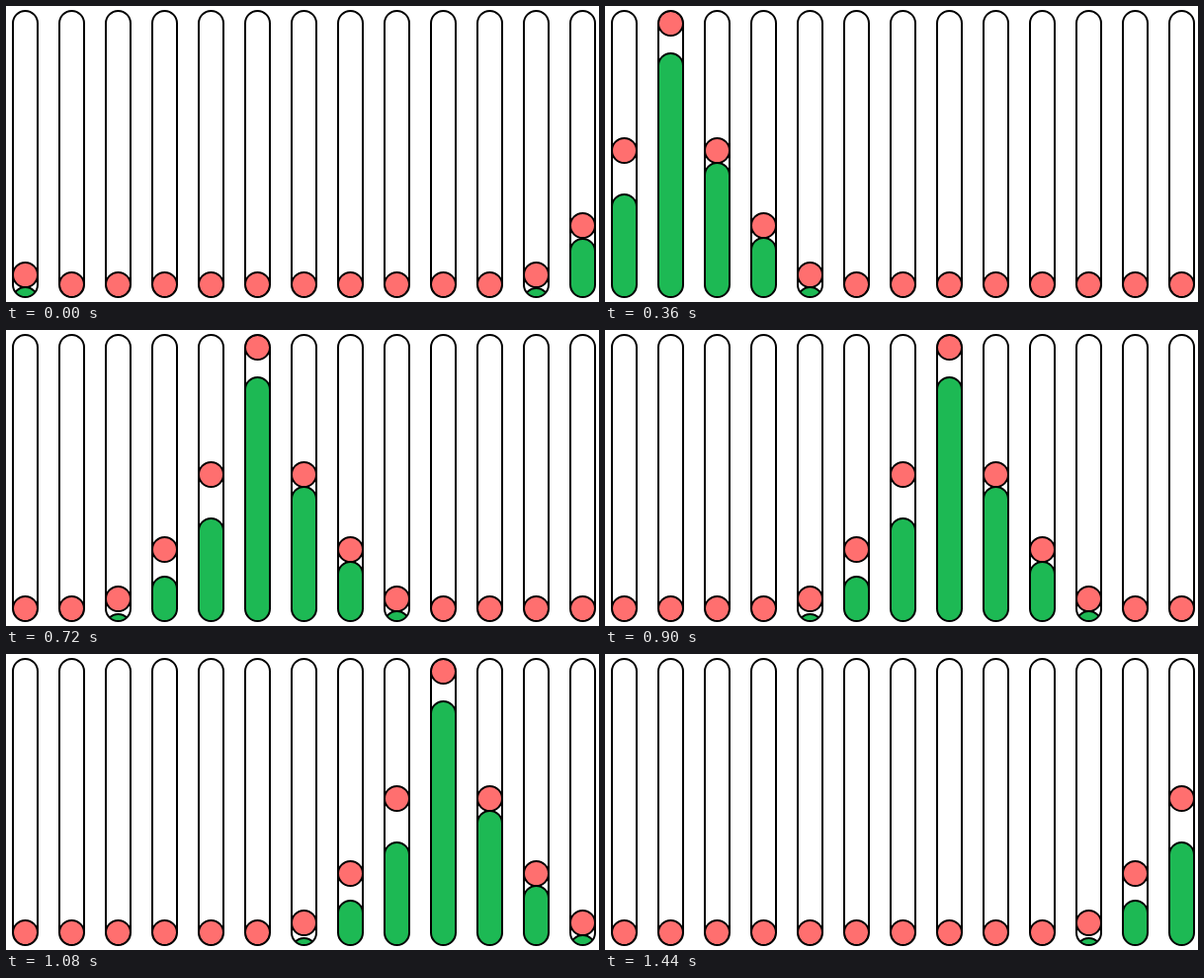
Animation of 600 by 300 pixels, one loop 1530 ms. Source, as an HTML page with a canvas:

```html
<!DOCTYPE html>
<html lang="en">
<head>
<meta charset="utf-8">
<title>Wave of balls in tubes</title>
<style>
  html, body { margin: 0; width: 100%; height: 100%; overflow: hidden; background: #fff; }
  canvas { display: block; }
</style>
</head>
<body>
<canvas id="stage" width="600" height="300"></canvas>
<script>
const ctx = document.getElementById('stage').getContext('2d');
const TUBES = 13, PITCH = 47, LEFT = 7, TOP = 5, BOTTOM = 295, W = 25, R = W / 2;
const STEP = 90, STEPS = 17;
const RED = '#ff6f6f', GREEN = '#1db954';

// Heights by distance from the crest
const LIFT = [265, 136, 60, 10];
const TRAIL = [247, 104, 45, 7];

function pill(x, y, h) {
  ctx.beginPath();
  ctx.roundRect(x, y, W, h, R);
}

function paint(color) {
  ctx.fillStyle = color;
  ctx.fill();
  ctx.stroke();
}

function tube(x, lift, level) {
  ctx.save();
  pill(x, TOP, BOTTOM - TOP);
  ctx.clip();
  if (level) {
    // The column runs on below the tube, so low levels become a lens
    pill(x, BOTTOM - level, level + 2 * W);
    paint(GREEN);
  }
  ctx.beginPath();
  ctx.arc(x + R, BOTTOM - R - lift, R, 0, 2 * Math.PI);
  paint(RED);
  ctx.restore();
  pill(x, TOP, BOTTOM - TOP);
  ctx.stroke();
}

function draw(step) {
  ctx.fillStyle = '#fff';
  ctx.fillRect(0, 0, 600, 300);
  ctx.lineWidth = 2;
  ctx.strokeStyle = '#000';
  for (let i = 0; i < TUBES; i++) {
    let d = i - (step - 3);
    // The outgoing wave is still visible as the next one enters
    if (step === 0 && d > 3) d -= STEPS;
    const lift = LIFT[Math.abs(d)] || 0;
    const trailing = d <= 0 && step > 0;
    const level = trailing ? TRAIL[-d] || 0 : Math.max(0, lift - (d < 0 ? 1 : 0));
    tube(LEFT + i * PITCH, lift, level);
  }
}

let shown = -1;
function tick() {
  const step = Math.floor(performance.now() / STEP) % STEPS;
  if (step !== shown) draw(shown = step);
  requestAnimationFrame(tick);
}
tick();
</script>
</body>
</html>
```
